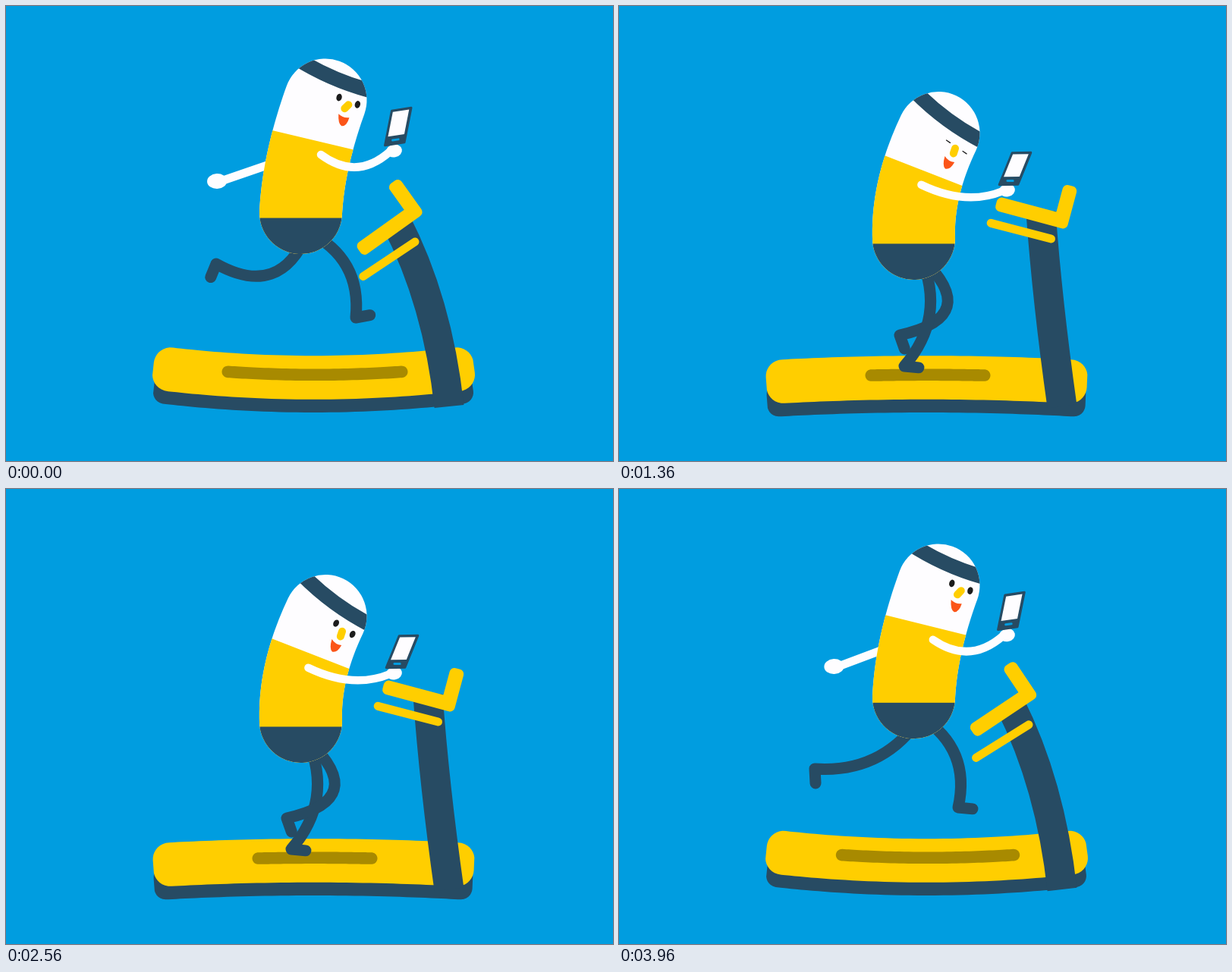
Animation, 800 px wide and 600 px high, one loop 4000 ms. Source, as an HTML page with a canvas:

```html
<!DOCTYPE html>
<html lang="en">
<head>
<meta charset="utf-8">
<title>Treadmill run</title>
<style>
  html, body { margin: 0; height: 100%; overflow: hidden; background: #009de0; }
  canvas { display: block; }
</style>
</head>
<body>
<canvas id="stage" width="800" height="600"></canvas>
<script>
const ctx = document.getElementById('stage').getContext('2d');
const BLUE = '#009de0', NAVY = '#274b63', YELLOW = '#ffce00', WHITE = '#fefdff',
      SHADE = '#a88a00', RED = '#fb5519', BLACK = '#1c1c1c';
const FRAME = 40, STEP = 10, STRIDE = 20, LAG = 0.25;

const { PI, sin, cos, atan2, hypot, max, abs, sqrt } = Math;
const radians = degrees => degrees * PI / 180;
const lerp = (a, b, k) => a + (b - a) * k;
const mix = (a, b, k) => a.map((v, i) => lerp(v, b[i], k));

function fill(path, color) {
  ctx.fillStyle = color;
  ctx.fill(path);
}

function stroke(path, color, width, cap = 'round') {
  ctx.strokeStyle = color;
  ctx.lineWidth = width;
  ctx.lineCap = ctx.lineJoin = cap;
  if (cap === 'butt') ctx.lineJoin = 'miter';
  ctx.stroke(path);
}

const line = (x0, y0, x1, y1) => new Path2D(`M${x0} ${y0} L${x1} ${y1}`);
const curve = (x0, y0, cx, cy, x1, y1) => new Path2D(`M${x0} ${y0} Q${cx} ${cy} ${x1} ${y1}`);

function ellipse(x, y, rx, ry, color, angle = 0) {
  const path = new Path2D();
  path.ellipse(x, y, rx, ry, angle, 0, PI * 2);
  fill(path, color);
}

function polygon(points) {
  const path = new Path2D();
  points.forEach(([x, y]) => path.lineTo(x, y));
  path.closePath();
  return path;
}

// Runs a drawing in a frame that is moved and turned.
function within(x, y, angle, drawing) {
  ctx.save();
  ctx.translate(x, y);
  ctx.rotate(angle);
  drawing();
  ctx.restore();
}

// One dip per step: slow at the top, quick towards the trough.
function dip(phase) {
  const half = STEP / 2, t = 1 - abs((phase + STEP) % STEP - half) / half;
  return t ** 3 * (4 - 3 * t);
}

// Rounded bar whose axis is bent into a parabola.
function bentBar(cx, cy, halfLength, halfHeight, radius, bend) {
  const n = 60, points = [];
  for (let i = 0; i < 2 * n; i++) {
    const u = -halfLength * cos(PI * i / n);
    const inset = max(0, abs(u) - halfLength + radius);
    const v = (halfHeight - radius + sqrt(max(0, radius ** 2 - inset ** 2))) * (i < n ? -1 : 1);
    points.push([cx + u - 2 * bend * u * v, cy + v + bend * u * u]);
  }
  return polygon(points);
}

function drawBase(press) {
  const bend = lerp(-0.0003, 0.00014, press);
  fill(bentBar(405, 514, 210, 22, 15, bend), NAVY);
  fill(bentBar(405.5, 490, 211.5, 28.8, 22, bend), YELLOW);
  fill(bentBar(407, 486.3, lerp(122.5, 82.5, press), 7.8, 7.8, bend), SHADE);
}

function drawStand(press) {
  const [controlX, topX, topY] = mix([569, 513.5, 283], [564.5, 556, 272], press);
  stroke(curve(584, 528, controlX, 390, topX, topY), NAVY, 39, 'butt');

  within(547.6, 325, radians(lerp(-35.5, 15, press)), () => {
    const grip = new Path2D();
    grip.roundRect(-65.5, -59, 98.5, 19, 6.5);
    grip.roundRect(14, -97.5, 19, 57.5, 6.5);
    fill(grip, YELLOW);
  });
  within(lerp(539, 569.5, press), lerp(311, 307, press), radians(lerp(-33.7, 14.6, press)),
    () => stroke(line(0, 0, -82, 0), YELLOW, 11));
}

// Key points of the ankle's loop: phase, x, y.
const ANKLE = [
  [0, 461, 411], [4, 376, 475], [6, 351, 467], [9, 258, 369],
  [10, 277, 340], [14, 370, 434], [16, 393, 426], [19, 447, 420]
];

// Smooth closed curve through the key points.
function ankleAt(phase) {
  const n = ANKLE.length, i = ANKLE.findLastIndex(key => key[0] <= phase);
  const [a, b, c, d] = [i - 1, i, i + 1, i + 2].map(j => {
    const [at, x, y] = ANKLE[(j + n) % n];
    return [at + Math.floor(j / n) * STRIDE, x, y];
  });
  const span = c[0] - b[0], t = (phase - b[0]) / span;
  return [1, 2].map(j => {
    const m0 = (c[j] - a[j]) / (c[0] - a[0]) * span;
    const m1 = (d[j] - b[j]) / (d[0] - b[0]) * span;
    return lerp(b[j], c[j], t * t * (3 - 2 * t)) + t * (1 - t) * ((1 - t) * m0 - t * m1);
  });
}

// The knee bends more while the leg swings; the foot flattens while it stands.
function drawLeg(phase, hipX, hipY) {
  const [x, y] = ankleAt(phase);
  const wave = sin(PI * (phase + 1) / STEP);
  const stand = max(0, wave), swing = max(0, -wave);
  const bend = (45 + 55 * swing ** 0.6) / hypot(x - hipX, y - hipY);
  const kneeX = (hipX + x) / 2 + (y - hipY) * bend;
  const kneeY = (hipY + y) / 2 - (x - hipX) * bend;
  const toe = atan2(y - kneeY, x - kneeX) - radians(97 + 28 * stand);
  const leg = curve(hipX, hipY, kneeX, kneeY, x, y);
  leg.lineTo(x + 19 * cos(toe), y + 19 * sin(toe));
  stroke(leg, NAVY, 15);
}

// Capsule of constant thickness around a curved spine.
function capsule(x0, y0, cx, cy, x1, y1, r) {
  const path = new Path2D(), n = 24;
  const angleAt = t => atan2(lerp(cy - y0, y1 - cy, t), lerp(cx - x0, x1 - cx, t)) + PI / 2;
  const side = (t, offset) => path.lineTo(
    lerp(lerp(x0, cx, t), lerp(cx, x1, t), t) + offset * cos(angleAt(t)),
    lerp(lerp(y0, cy, t), lerp(cy, y1, t), t) + offset * sin(angleAt(t)));
  path.arc(x0, y0, r, angleAt(0), angleAt(0) + PI);
  for (let i = 0; i <= n; i++) side(i / n, -r);
  path.arc(x1, y1, r, angleAt(1) + PI, angleAt(1) + 2 * PI);
  for (let i = n; i >= 0; i--) side(i / n, r);
  path.closePath();
  return path;
}

function drawFace(crouch, blink) {
  for (const x of [-13, 13]) {
    if (blink) stroke(line(x - 3, 2, x + 3, 2), BLACK, 1.3);
    else ellipse(x, 0, 3.6, 4.9, BLACK, -0.1);
  }
  const nose = lerp(2, 1.15, crouch), dx = 3.5 * cos(nose), dy = 3.5 * sin(nose);
  stroke(line(0.5 - dx, 7.8 - dy, 0.5 + dx, 7.8 + dy), YELLOW, 10);
  fill(new Path2D('M-6 20.5 Q2 24 9 20 Q10 32 3.5 34 Q-2 33 -6 20.5'), RED);
}

function drawBody(crouch, blink) {
  const waist = lerp(272.5, 313.5, crouch), headY = lerp(124, 176.5, crouch);
  const body = capsule(388.5, waist, lerp(392, 385, crouch), lerp(205, 248, crouch), 421, headY, 54.5);
  const [faceX, faceY, tilt] = mix([451.2, 125.2, 21], [444.8, 196.5, 36.6], crouch);

  fill(body, WHITE);
  ctx.save();
  ctx.clip(body);
  within(lerp(404.5, 400, crouch), lerp(176.7, 225.2, crouch), radians(lerp(13.4, 23, crouch)), () => {
    ctx.fillStyle = YELLOW;
    ctx.fillRect(-150, 0, 300, 300);
  });
  ctx.fillStyle = NAVY;
  ctx.fillRect(300, waist + 7, 200, 200);
  within(faceX, faceY, radians(tilt), () =>
    stroke(curve(-85, -28, -30, -17, 26, -23.5), NAVY, 19.5));
  ctx.restore();
  within(faceX, faceY, radians(tilt), () => drawFace(crouch, blink));
}

function drawBackArm(crouch) {
  const [x, y] = mix([278, 231], [372, 285], crouch);
  stroke(line(lerp(350, 385, crouch), lerp(208, 250, crouch), x + 8, y - 1), WHITE, 11);
  ellipse(x, y, 13, 10, WHITE, -0.05);
}

function drawPhoneArm(press, crouch) {
  const [shoulderX, shoulderY] = mix([415, 196], [395, 244], crouch);
  const wristY = lerp(192, 244, press);
  stroke(curve(shoulderX, shoulderY, lerp(462, 457, press), lerp(231, 264, press), 506, wristY), WHITE, 10.5);
  ellipse(511.5, wristY - 1, 10.5, 8.5, WHITE, -0.2);

  // The phone is a slanted box with its own unit axes.
  const [x, y, ux, uy, vx, vy] = mix(
    [507, 137, 29, -4.5, -9.5, 48.5], [517, 192.5, 28, -0.5, -18, 44.5], press);
  const at = (u, v) => [x + u * ux + v * vx, y + u * uy + v * vy];
  const box = (u0, v0, u1, v1) => polygon([at(u0, v0), at(u1, v0), at(u1, v1), at(u0, v1)]);
  const shell = box(0.06, 0.03, 0.94, 0.97);
  fill(shell, NAVY);
  stroke(shell, NAVY, 3);
  fill(box(0.12, 0.07, 0.86, 0.74), WHITE);
  stroke(line(...at(0.37, 0.86), ...at(0.63, 0.86)), BLUE, 3);
}

function draw(now) {
  const frame = Math.floor(now / FRAME) % 100;
  const phase = frame % STEP, stride = frame % STRIDE;
  // Both amounts are 1 at a reference pose and pass it at the trough.
  const press = dip(phase) / dip(4);
  const crouch = dip(phase - LAG) / dip(6 - LAG);
  const hip = [398, lerp(298, 339, crouch)];

  ctx.fillStyle = BLUE;
  ctx.fillRect(0, 0, 800, 600);
  drawBase(press);
  drawBackArm(crouch);
  drawLeg(stride, ...hip);
  drawLeg((stride + STEP) % STRIDE, ...hip);
  drawBody(crouch, stride >= 13 && stride <= 15);
  drawStand(press);
  drawPhoneArm(press, crouch);
}

const start = performance.now();
function tick() {
  draw(performance.now() - start);
  requestAnimationFrame(tick);
}
tick();
</script>
</body>
</html>
```
